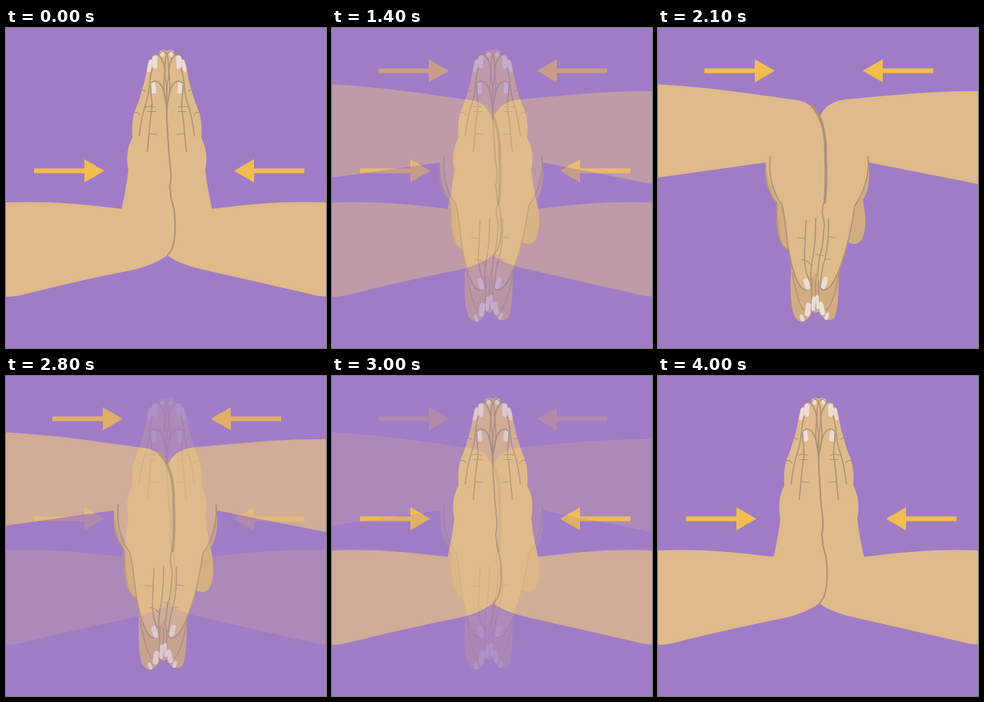
An HTML page with a canvas that plays this animation: 400x400 px, repeating every 4.4 s.

```html
<!DOCTYPE html>
<html lang="en">
<head>
<meta charset="utf-8">
<title>Prayer stretch</title>
<style>
  html, body { margin: 0; width: 100%; height: 100%; overflow: hidden; background: #a07cc6; }
  canvas { display: block; width: 400px; height: 400px; }
</style>
</head>
<body>
<canvas id="stage" width="400" height="400"></canvas>
<script>
const SIZE = 400, LOOP = 4400, STEP = 100;
const BACK = '#a07cc6', SKIN = '#dfba8b', SHADE = '#d2ad81',
      LINE = '#ad9275', NAIL = '#ebddd5', ARROW = '#f2bd4f';

function fill(c, path, color) {
  c.fillStyle = color;
  c.fill(new Path2D(path));
}

function stroke(c, path, width = 1.7) {
  c.strokeStyle = LINE;
  c.lineWidth = width;
  c.lineCap = c.lineJoin = 'round';
  c.stroke(new Path2D(path));
}

function nail(c, x, y, rx, ry, tilt = 0) {
  c.save();
  c.translate(x, y);
  c.rotate(tilt);
  c.fillStyle = NAIL;
  c.beginPath();
  c.roundRect(-rx, -ry, rx * 2, ry * 2, rx);
  c.fill();
  c.restore();
}

// Draws once as is and once reflected in the vertical line at x = axis.
function mirrored(c, axis, draw) {
  draw();
  c.save();
  c.translate(axis * 2, 0);
  c.scale(-1, 1);
  draw();
  c.restore();
}

function arrows(c, axis, x, y) {
  mirrored(c, axis, () => fill(c,
    `M${x} ${y - 3}h63v-11.5l25 14.5l-25 14.5v-11.5h-63z`, ARROW));
}

function handsUp(c) {
  fill(c, `M0 218 C45 216 92 219 144.500 226 C148 211 151 194 153 178
    C150 164 151 150 158 137 C157 124 158 112 161 104 C167 90 172 72 175 58
    C177 45 178 38 182 39 C184 33 187 32 191 34 C192 28 197 26 201 29
    C205 26 210 28 211 34 C215 32 218 33 220 39 C224 39 225 45 227 58
    C230 72 235 90 241 104 C244 112 245 124 244 137 C251 150 252 164 249 178
    C251 194 254 211 257.500 226 C310 219 355 216 400 218
    V335.500 Q390 335.500 378 332 L242 301 Q214 294 201.500 284
    Q188 295 160 302 Q85 317 20 333.500 Q10 336 0 336Z`, SKIN);

  mirrored(c, 201, () => {
    nail(c, 186, 42.500, 3.200, 8.500, .05);
    nail(c, 179.700, 47.500, 2.200, 8, .2);
    nail(c, 195, 32, 2.400, 4, -.3);
    nail(c, 184.200, 74.500, 3.200, 7.500, -.12);
    stroke(c, 'M184 34 Q190 31 194 38 C199 46 199 52 197.500 65 Q196 80 201 98', 1.5);
    stroke(c, 'M192 33 Q194 27 199 30 Q203 34 203 45 Q204 62 201 73', 1.3);
    stroke(c, 'M181 69 Q187 63 193 70 Q199 79 201 103', 1.5);
    stroke(c, 'M183 50 Q180 60 179 74 Q178 86 173 100 Q169 114 166.500 135', 1.5);
    stroke(c, 'M181 71 C180 83 184 92 182 104 C179 118 179 137 176.500 154', 1.5);
    stroke(c, 'M159 107 Q164 103 167.500 109 M174 99 Q181 97 187 99', 1.1);
    stroke(c, 'M177 104.500 L187 104.500 M179 132 L188.500 133 M168 76 L174 79', 1.1);
  });
  stroke(c, 'M201 72 Q200 103 202 130 Q203 155 206 180 Q207 190 204.500 198 '
    + 'Q206 203 206 211 Q208 219 210 226 Q214 260 207 277 L202 284', 1.9);
  arrows(c, 204, 35, 178.5);
}

function handsDown(c) {
  // Thumbs and far fingers sit behind the front hands.
  fill(c, 'M138 158 Q134 160 134 172 C132 190 138 207 148 219 C147 245 149 273 163 278 L172 220Z', SHADE);
  fill(c, 'M262 160 C266 182 264 206 256 214 C259 230 262 248 255 264 C249 273 239 270 236 266 L240 220Z', SHADE);
  fill(c, `M167 290 C165 325 165 348 171 361 Q178 370 184 366 Q191 361 192 354
    L197 356 L202 354 Q204 361 209 364 Q217 367 221 361 C227 345 225 320 227 290Z`, SHADE);
  stroke(c, 'M192 302 Q193 334 191 354 M201 300 Q200 334 202 353 M197 315 V351', 1.4);
  stroke(c, 'M168 306 Q174 342 182 353 M226 306 Q221 340 211 353', 1.3);
  nail(c, 180, 362.500, 2.300, 4.500, -.4);
  nail(c, 187.500, 352, 3.300, 8.500, .15);
  nail(c, 194.500, 344.500, 2.400, 9, .08);
  nail(c, 199.300, 342.500, 2, 9, -.05);
  nail(c, 204.500, 350.500, 3.200, 8.500, -.2);
  nail(c, 211, 360.500, 2.300, 4.500, .4);

  fill(c, `M0 70.500 C55 73 115 82 165 89 C184 90 197 98 202 112
    C207 98 219 90 242 88.500 C295 84 345 78 400 79 V195 L263 168
    C264 189 255 211 246 224 C242 247 238 274 230 292 Q222 321 211 328
    Q203 329 203 324 L199 304 L192 312 Q193 326 187 328 Q179 327 173 314
    C164 287 160 252 155 224 C144 208 138 190 135 168 L0 187Z`, SKIN);
  stroke(c, 'M140.500 161 C137 183 144 207 155 221 C160 240 160 265 165 287 Q172 319 181 326 Q187 330 191 324', 1.6);
  stroke(c, 'M262.500 161 C265 183 257 207 246 222 C242 248 238 269 232 286 Q222 318 213 325 Q205 331 203 324', 1.6);
  stroke(c, 'M134.500 170 C133 190 139 207 148.500 219 C148 245 150 272 162 277', 1.4);
  stroke(c, 'M192 97 C205 110 210 132 209.500 160 Q211 191 208.500 218', 3.4);
  stroke(c, 'M208.500 216 Q204 225 206 235 Q209 244 207 256 Q206 275 202 286 L199 311', 1.6);
  stroke(c, 'M185 240 Q184 264 183 285 Q183 302 189 315', 1.5);
  stroke(c, 'M197 238 Q197 267 194 284 Q190 301 191 324', 1.5);
  stroke(c, 'M213 239 C214 263 212 277 208 291 Q204 304 203 324', 1.5);
  stroke(c, 'M174 262 L184 263 M212 261 L222 262 M179 290 Q185 288 191 296', 1.1);
  stroke(c, 'M197 283 L206 284.500 M209 289 L216 289', 1.1);
  nail(c, 186, 320, 3.200, 7.500, -.3);
  nail(c, 208, 318.500, 3.200, 7.500, .3);
  arrows(c, 201, 58, 53.5);
}

function render(draw) {
  const canvas = document.createElement('canvas');
  canvas.width = canvas.height = SIZE;
  const c = canvas.getContext('2d');
  c.fillStyle = BACK;
  c.fillRect(0, 0, SIZE, SIZE);
  draw(c);
  return canvas;
}

const up = render(handsUp), down = render(handsDown);
const stage = document.getElementById('stage').getContext('2d');

// Linear dissolve advancing in whole steps, half done at the given time.
const dissolve = (time, middle) =>
  Math.min(1, Math.max(0, .5 + .29 * (time - middle) / STEP));

function frame() {
  const time = Math.floor(performance.now() % LOOP / STEP) * STEP;
  stage.globalAlpha = 1;
  stage.drawImage(up, 0, 0);
  stage.globalAlpha = dissolve(time, 1400) - dissolve(time, 2900);
  stage.drawImage(down, 0, 0);
  requestAnimationFrame(frame);
}
frame();
</script>
</body>
</html>
```
